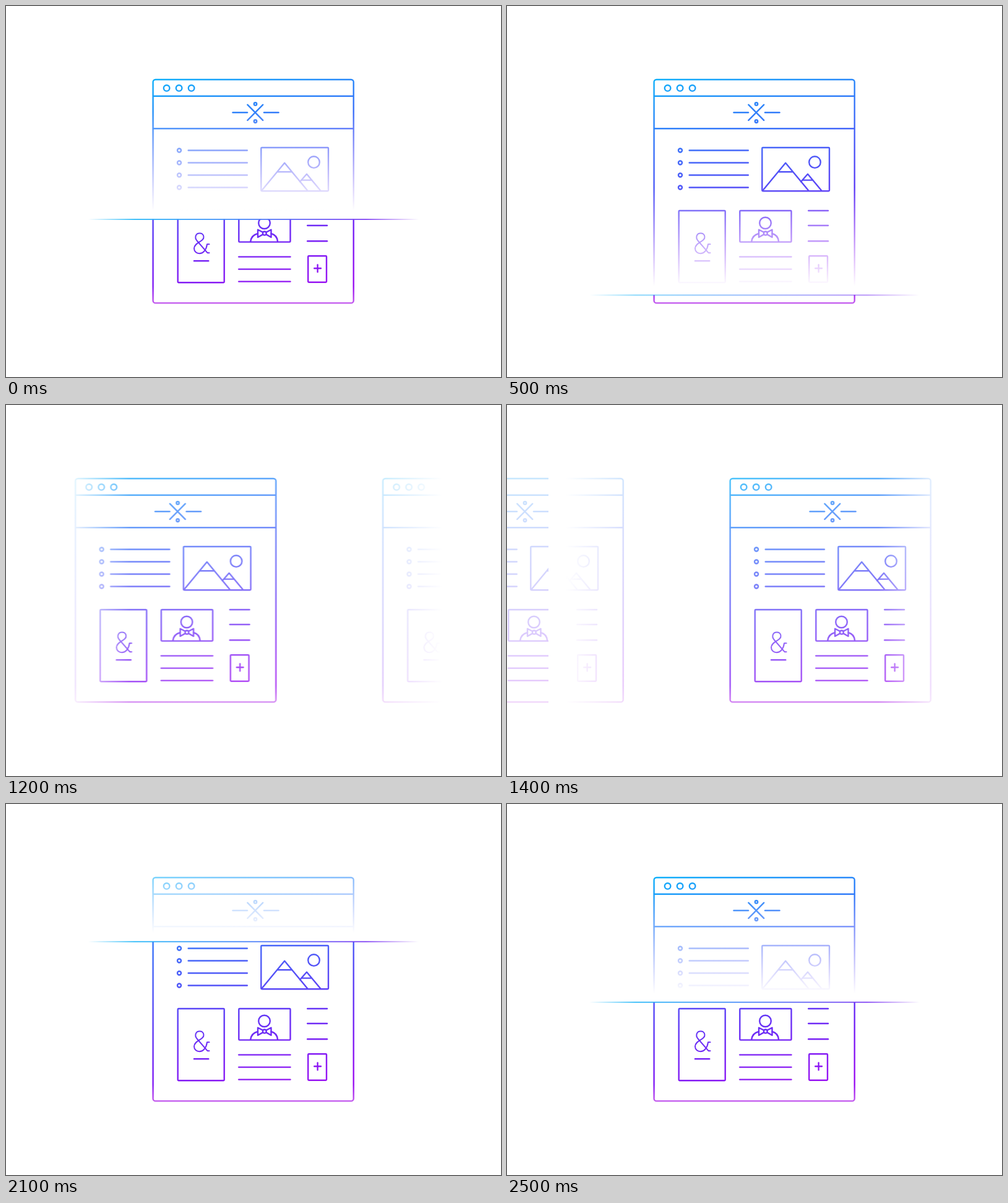
Write an HTML page with a canvas that moves like this. It is 800 by 600 pixels and loops after 2.6 s.

```html
<!DOCTYPE html>
<html lang="en">
<head>
<meta charset="utf-8">
<title>Page scan</title>
<style>
  html, body { margin: 0; width: 100%; height: 100%; overflow: hidden; background: #fff; }
  canvas { display: block; width: 800px; height: 600px; }
</style>
</head>
<body>
<canvas id="stage"></canvas>
<script>
const W = 800, H = 600, LOOP = 2600;
const SLIDE_START = 1100, SLIDE_TIME = 400, SLIDE_DIST = 497;
const SCAN_START = 1600, SCAN_TOP = 99.6, SCAN_SPEED = 0.2449;
const CLEAR = 'rgba(255,255,255,0)';

const ratio = window.devicePixelRatio || 1;
const clamp = v => Math.max(0, Math.min(1, v));

function setUp(canvas) {
  canvas.width = W * ratio;
  canvas.height = H * ratio;
  const c = canvas.getContext('2d');
  c.scale(ratio, ratio);
  return c;
}

function gradient(c, x0, y0, x1, y1, stops) {
  const g = c.createLinearGradient(x0, y0, x1, y1);
  for (const [at, color] of stops) g.addColorStop(at, color);
  return g;
}

function paint(c, fill, x, y, w, h) {
  c.fillStyle = fill;
  c.fillRect(x, y, w, h);
}

function drawPage(c) {
  const path = d => c.stroke(new Path2D(d));
  const hline = (x0, x1, y) => path(`M${x0} ${y}H${x1}`);
  const ring = (x, y, r) => {
    c.beginPath();
    c.arc(x, y, r, 0, Math.PI * 2);
    c.stroke();
  };
  const box = (x0, y0, x1, y1, r) => {
    c.beginPath();
    c.moveTo(x0 + r, y0);
    c.arcTo(x1, y0, x1, y1, r);
    c.arcTo(x1, y1, x0, y1, r);
    c.arcTo(x0, y1, x0, y0, r);
    c.arcTo(x0, y0, x1, y0, r);
    c.closePath();
    c.stroke();
  };

  c.lineWidth = 2.4;
  c.lineCap = c.lineJoin = 'round';

  // Browser frame
  box(237.6, 119, 561.7, 480.4, 4);
  hline(238, 561, 145.7);
  hline(238, 561, 198.2);
  for (const x of [259.6, 279.6, 299.6]) ring(x, 132.8, 4.8);

  // Header ornament
  hline(366.5, 390, 172.3);
  hline(417, 440.5, 172.3);
  path('M390.3 159.7L415.2 184.8M415.2 159.7L390.3 184.8');
  ring(403, 158.4, 2.2);
  ring(403, 186.5, 2.2);

  // Bullet list
  for (let i = 0; i < 4; i++) {
    const y = 233.5 + i * 20;
    ring(280, y, 3);
    hline(294.7, 389.8, y);
  }

  // Landscape
  box(412.3, 229, 521, 299.3, 1.2);
  ring(497.5, 252.6, 9.3);
  path('M413 298.8L450.2 253.8L487.5 298.8M438.5 268.2H462');
  path('M475 284.2L486 271.8L508.5 298.8M477.5 281.6H494');

  // Ampersand card
  box(277.7, 331, 352.7, 447.2, 1.2);
  c.lineWidth = 2;
  path('M328.5 399.2H325.5L308.5 379.5C304 373.8 307 367.5 313 367.5' +
       'C319.5 367.5 321.5 374.5 317 378.5C313 382 304 385 304 392' +
       'C304 397 308 400.2 312.5 400.2C319 400.2 324 394 325 385.2H328.5');
  c.lineWidth = 2.4;
  hline(304, 327.2, 412.2);

  // Portrait
  box(376.3, 331, 459.5, 381.6, 1.2);
  ring(417.5, 351, 9.3);
  path('M395.2 381C396 373.5 401 369.5 407 368M428.5 368C434 369.5 438.5 373.5 439 381');
  path('M414.8 365.8L407 361.7V374L414.8 369.6M420.8 365.8L428.5 361.7V374L420.8 369.6');
  ring(417.8, 367.7, 2.9);
  for (const y of [405.6, 425.6, 445.6]) hline(376.2, 459.5, y);

  // Side column
  for (const y of [331, 355, 380.3]) hline(487.2, 519, y);
  box(488.2, 404.2, 518, 446.7, 1.2);
  path('M498.2 424.3H509M503.6 418.5V430.3');

  // Tint the line work, slanted down to the right
  const slope = 0.21, len = 390, k = len / (1 + slope * slope);
  c.globalCompositeOperation = 'source-in';
  paint(c, gradient(c, 237, 119, 237 + slope * k, 119 + k, [
    [0, '#10b0fa'], [0.18, '#2b87fa'], [0.38, '#4766f9'], [0.5, '#5353f7'],
    [0.66, '#6238f6'], [0.82, '#7b20f5'], [1, '#9a12f2']
  ]), 0, 0, W, H);
  c.globalCompositeOperation = 'source-atop';
  paint(c, gradient(c, 0, 454, 0, 480, [
    [0, 'rgba(194,88,238,0)'], [1, '#c258ee']
  ]), 0, 454, W, 40);
}

const page = document.createElement('canvas');
drawPage(setUp(page));
const ctx = setUp(document.getElementById('stage'));

const beam = gradient(ctx, 133, 0, 667, 0, [
  [0, 'rgba(30,185,250,0)'], [0.14, '#22b6f8'], [0.45, '#3f86f9'],
  [0.84, '#7a38f3'], [1, 'rgba(130,50,240,0)']
]);
const leftVeil = gradient(ctx, 95, 0, 200, 0, [[0, '#fff'], [1, CLEAR]]);
const rightVeil = gradient(ctx, 600, 0, 705, 0, [[0, CLEAR], [1, '#fff']]);

function stamp(x, alpha) {
  if (alpha <= 0) return;
  ctx.globalAlpha = alpha;
  ctx.drawImage(page, x, 0, W, H);
  ctx.globalAlpha = 1;
}

function render(t) {
  const slide = clamp((t - SLIDE_START) / SLIDE_TIME);
  const scan = (t - SCAN_START + 100 + LOOP) % LOOP - 100;
  const y = SCAN_TOP + scan * SCAN_SPEED;

  paint(ctx, '#fff', 0, 0, W, H);
  stamp(-SLIDE_DIST * slide, 1 - slide);
  stamp(SLIDE_DIST * (1 - slide), slide);

  // Soft erase trailing above the beam
  paint(ctx, gradient(ctx, 0, y - 174, 0, y - 14, [[0, CLEAR], [1, '#fff']]),
    0, y - 174, W, 174);

  paint(ctx, leftVeil, 67, 0, 133, H);
  paint(ctx, rightVeil, 600, 0, 200, H);

  ctx.globalAlpha = Math.min(clamp((scan + 100) / 300), clamp((1740 - scan) / 400));
  paint(ctx, beam, 133, y - 0.5, 534, 1.7);
  ctx.globalAlpha = 1;
}

const start = performance.now();
function tick() {
  render((performance.now() - start) % LOOP);
  requestAnimationFrame(tick);
}
tick();
</script>
</body>
</html>
```
